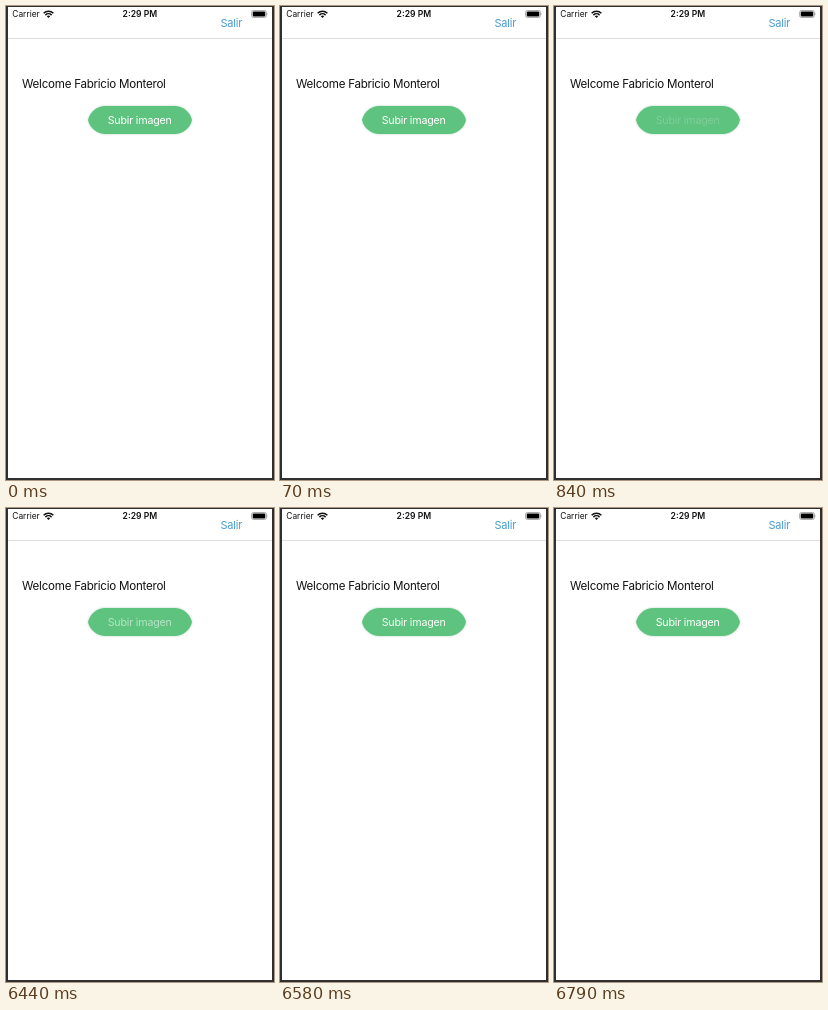
An HTML page that plays this animation: 268x474 px, repeating every 8000 ms.

```html
<!DOCTYPE html>
<html lang="es">
<head>
<meta charset="utf-8">
<title>Subir imagen</title>
<style>
  html, body { margin: 0; width: 100%; height: 100%; overflow: hidden; background: #fff; }
  svg { display: block; width: 268px; height: 474px; }
  text { font-family: Inter, Roboto, sans-serif; fill: #111; }
  .status { font-size: 8.4px; }
  .clock { font-size: 8.6px; font-weight: 600; }
  .link { font-size: 11px; letter-spacing: -0.2px; fill: #4a9bd4; }
  .greeting { font-size: 11.6px; letter-spacing: -0.25px; }
  .label { font-size: 10.7px; letter-spacing: -0.2px; fill: #fff; }
  .button { fill: #5ec37f; filter: drop-shadow(0 0 1px rgba(70, 150, 100, .4)); }
</style>
</head>
<body>
<svg viewBox="0 0 268 474">
  <rect width="268" height="474" fill="#2f2f31"/>
  <rect x="2" y="1" width="264" height="471" fill="#fff"/>
  <rect x="2" y="32" width="264" height="1" fill="#dedede"/>

  <text class="status" x="6.3" y="11.3">Carrier</text>
  <g fill="none" stroke="#111" stroke-width="1.5">
    <path d="M37.6 7.2a6.9 6.9 0 0 1 9.8 0"/>
    <path d="M39.4 9.1a4.4 4.4 0 0 1 6.2 0"/>
    <path d="M42.5 12l-1.7-1.7a2.4 2.4 0 0 1 3.4 0z" fill="#111" stroke="none"/>
  </g>
  <text class="clock" x="116.6" y="11.2">2:29 PM</text>
  <rect x="245.5" y="4.5" width="15" height="7" rx="2" fill="none" stroke="#999" stroke-width=".8"/>
  <rect x="246.7" y="5.6" width="12.6" height="4.9" rx="1" fill="#000"/>
  <path d="M261.4 6.8q1.1 1.2 0 2.4z" fill="#999"/>

  <text class="link" x="214.5" y="20.8">Salir</text>
  <text class="greeting" x="16" y="82.2">Welcome Fabricio Monterol</text>

  <path class="button" d="M99.5 100H168.5A18 18 0 0 1 186 114A18 18 0 0 1 168.5 128H99.5A18 18 0 0 1 82 114A18 18 0 0 1 99.5 100Z"/>
  <text class="label" id="label" x="101.7" y="118">Subir imagen</text>
</svg>
<script>
  const LOOP = 8000;
  // [start in ms, label opacity]
  const steps = [[0, 1], [840, .2], [6440, .55], [6510, .76], [6580, .95], [6790, 1], [LOOP, 1]];
  const keyframes = steps.map(([time, opacity]) => ({
    offset: time / LOOP, opacity, easing: 'steps(1, end)'
  }));
  document.getElementById('label').animate(keyframes, { duration: LOOP, iterations: Infinity });
</script>
</body>
</html>
```
